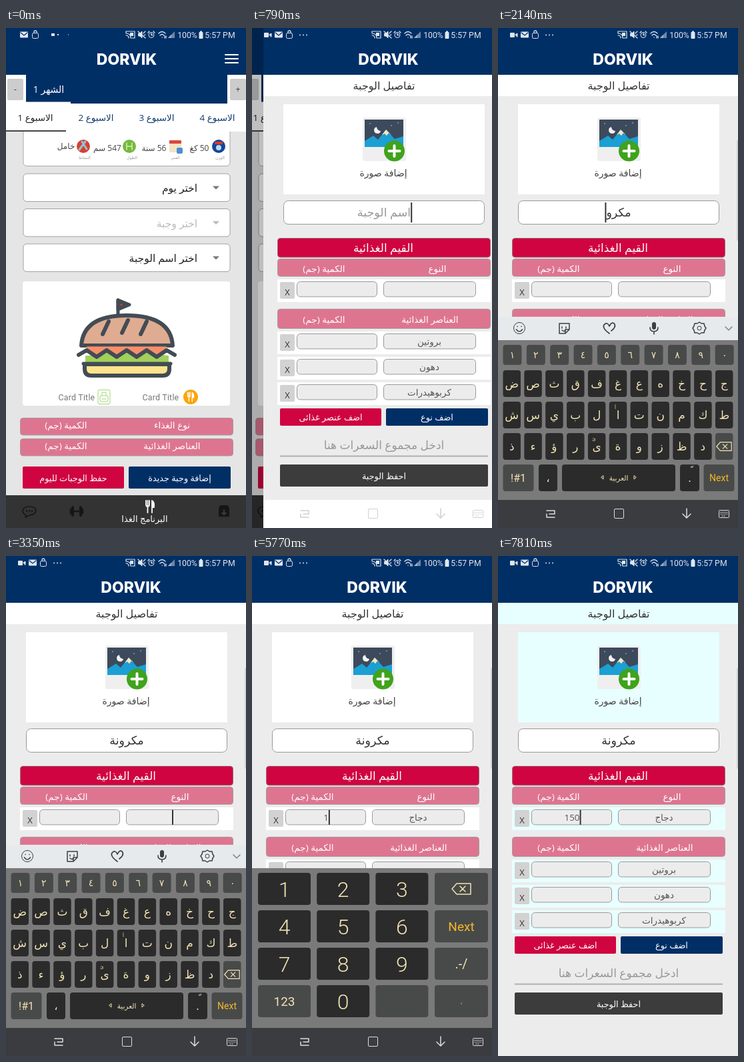
Animation, 360 px wide and 748 px high, one loop 8000 ms. Source, as an HTML page:

```html
<!DOCTYPE html>
<html lang="ar">
<head>
<meta charset="utf-8">
<style>
html,body{margin:0;width:100%;height:100%;overflow:hidden;background:#ececec}
svg{display:block;width:360px;height:748px}
text{font-family:"Open Sans","DejaVu Sans",sans-serif;text-anchor:middle}
.ar{direction:rtl}
.start{text-anchor:start}
.ro{font-family:Roboto,sans-serif}
.thin{font-weight:300}
.logo{font-family:Inter,sans-serif;font-weight:800}
.w{fill:#fff}
</style>
</head>
<body>
<svg id="stage" viewBox="0 0 360 748"></svg>
<script>
const LOOP = 8000, NAVY = '#002f66', RED = '#cf0441', PINK = '#de7590', KEY = '#2b2b2b', KEY2 = '#484a49', IVORY = '#f3e3b4';

const R = (x, y, w, h, fill, r = 0, stroke = 'none', cls = '') =>
  `<rect x="${x}" y="${y}" width="${w}" height="${h}" fill="${fill}" rx="${r}" stroke="${stroke}" class="${cls}"/>`;
const C = (x, y, r, fill, stroke = 'none') => `<circle cx="${x}" cy="${y}" r="${r}" fill="${fill}" stroke="${stroke}"/>`;
const P = (d, stroke, w = 1, fill = 'none') =>
  `<path d="${d}" stroke="${stroke}" stroke-width="${w}" fill="${fill}" stroke-linecap="round" stroke-linejoin="round"/>`;
const T = (x, y, s, size, fill, cls = 'ar', extra = '') =>
  `<text x="${x}" y="${y}" font-size="${size}" fill="${fill}" class="${cls}" ${extra}>${s}</text>`;
const G = (id, body, extra = '') => `<g id="${id}" ${extra}>${body}</g>`;
const at = (x, y, body) => `<g transform="translate(${x} ${y})">${body}</g>`;

const logo = x => T(x, 54.5, 'DORVIK', 23, '#fff', 'logo');
const button = (x, y, w, h, fill, label) => R(x, y, w, h, fill, 2) + T(x + w / 2, y + h / 2 + 5, label, 12.8, '#fff');
const fork = (x, y, k, c) => at(x, y, `<g transform="scale(${k})">` +
  P('M-6 -9V-3Q-6 0 -3.5 0Q-1 0 -1 -3V-9M-3.5 -9V9', c, 1.8) + P('M3 9V-9Q7 -7 6 1H3', c, 1.8, c) + '</g>');

// Home page
function burger() {
  const ink = '#434c55';
  return P('M168 407V431', ink, 5) + P('M168 407L185 414L168 421Z', ink, 5, ink) + C(173, 414, 1.5, '#e33') +
    P('M113 475Q116 430 181 430Q247 430 250 475Z', ink, 6, '#dfac91') +
    P('M154 439L145 458M183 437L174 456M211 439L202 458', ink, 6) +
    P('M122 478H240L226 489L211 478L196 489L181 478L166 489L151 478L136 489Z', '#f98f68', 3, '#f98f68') +
    P('M120 491V499H243V491L226 489L211 481L196 491L181 481L166 491L151 481L136 491Z', '#a2d05a', 2, '#a2d05a') +
    P('M109 489L121 482L136 492L151 482L166 492L181 482L196 492L211 482L226 492L241 482L253 489', ink, 6) +
    P('M118 503H245V510Q245 520 235 520H128Q118 520 118 510Z', ink, 6, '#fde48c') + P('M116 502H247', ink, 5);
}

function home() {
  const small = (x, y, s) => T(x, y, s, 12, '#444');
  const title = x => T(x, 556.5, 'Card Title', 12.4, '#777', 'ro', 'letter-spacing=".2"');
  let s = R(0, 0, 360, 748, '#e5e5e5');
  s += R(26, 120, 310, 86.5, '#fff', 5, '#aaa');
  s += small(90, 181, 'خامل') + small(152, 184, '547 سم') + small(222, 184, '56 سنة') + small(290, 184, '50 كغ');
  s += C(116, 177, 10, '#d9402f') + P('M110 182L119 170M114 170L121 181', '#8ac4d8', 3) +
    C(185, 177, 10, '#76b83f') + P('M181 172V182M189 172V182M181 177H189', '#d4efb4', 1.5) +
    R(245, 168, 18, 18, '#f4e3c4', 1) + R(245, 168, 18, 5, '#d8483b', 1) + R(256, 179, 9, 9, '#4b8fd6', 2) +
    C(319, 177, 10, '#13469a') + R(313, 170, 12, 4, '#d33b35', 1) + C(319, 179, 4, '#b9d8ee');
  [['النشاط', 118], ['الطول', 189], ['العمر', 254], ['الوزن', 321]].forEach(([n, x]) => s += T(x, 196, n, 6, '#999'));
  s += R(0, 0, 360, 70, NAVY) + R(0, 70, 360, 85, '#fff') + R(30, 70, 302, 43, NAVY) + R(30, 110.5, 67, 2.5, '#fff') +
    R(2, 76, 24, 32, '#ccc', 2) + T(14, 96, '-', 12, '#333') + R(336, 76, 24, 32, '#ccc', 2) + T(348, 96, '+', 12, '#333') +
    T(64, 97, 'الشهر 1', 14, '#fff') + logo(181) + P('M329 40H348M329 46H348M329 52H348', '#fff', 2);
  [44, 135, 226, 317].forEach((x, i) => s += T(x, 139, 'الاسبوع ' + (i + 1), 13.5, i ? '#123c70' : '#222'));
  s += R(0, 153, 90, 2, '#444');
  [['اختر يوم', 218, '#222'], ['اختر وجبة', 270.5, '#bbb'], ['اختر اسم الوجبة', 323, '#222']].forEach(([n, y, c]) =>
    s += R(26, y, 310, 41.5, '#fff', 5, '#a2a2a2') + T(287, y + 27, n, 15.5, c, 'ar start') +
      `<path d="M310 ${y + 18.5}h10l-5 5z" fill="${c == '#bbb' ? c : '#777'}"/>`);
  s += R(25, 379, 311, 186, '#fff', 4) + burger() + title(106) + title(232) +
    R(138, 541.5, 18, 21, '#fff', 2, '#a4d774') + R(141, 550, 12, 9, 'none', 2, '#a4d774') + P('M144 549V545H150V549M144 555H150', '#a4d774') +
    C(277, 552, 11, '#fba50a') + fork(277, 552, .75, '#fff');
  [['نوع الغذاء', 583], ['العناصر الغذائية', 614]].forEach(([n, y]) =>
    s += R(21.5, y + .5, 319, 25.5, PINK, 4, '#a59a9d') + T(90, y + 16, 'الكمية (جم)', 13.5, '#fff') + T(249, y + 16, n, 13.5, '#fff'));
  s += button(25, 656, 152, 33, RED, 'حفظ الوجبات لليوم') + button(184, 656, 153, 33, NAVY, 'إضافة وجبة جديدة') +
    R(184, 656, 153, 33, '#fff', 2, 'none', 'press');
  s += R(0, 699, 360, 49, '#333') + fork(216, 716, 1, '#fff') + T(208, 739, 'البرنامج الغذا', 13, '#fff');
  s += P('M30 729Q25 726 25 722Q26 716 35 716Q44 716 45 722Q44 728 35 729L29 732Z', '#161616', 1.6) +
    P('M31 722.5H31.1M35 722.5H35.1M39 722.5H39.1', '#161616', 2.5) +
    P('M100 717V729M112 717V729', '#161616', 4) + P('M97 720V726M115 720V726M100 723H112', '#161616', 2.5) +
    P('M320 718L322 715H332L334 718V730H320Z', '#161616', 2, '#161616') + P('M327 721V727M324 725L327 728L330 725', '#444', 1.5);
  return s;
}

// Meal details page
function picture() {
  return R(149, 134, 65, 65, '#efefef', 3) + R(152, 137, 58, 41, '#3c4a5c') +
    P('M152 178V169L165 161L172 167L184 152L197 166L210 162V178Z', 'none', 0, '#1c9fd3') +
    P('M184 152L178 160L182 158L185 161L188 157L192 160Z', 'none', 0, '#fbe5c0') +
    P('M170 148A5 5 0 1 0 176 154A6 6 0 0 1 170 148Z', 'none', 0, '#f4f4f4') +
    P('M160 143H160.1M192 146H192.1M202 142H202.1', '#dde', 1.3) +
    C(196.5, 184, 15.5, '#3fa31c') + P('M196.5 176V192M188.5 184H204.5', '#fff', 4);
}

function row(y, name = '') {
  return R(21, y, 320, 34, '#fff', 0, 'none', 'w') + R(25, y + 4, 22, 25, '#d2d2d2', 2) + T(36, y + 23.5, 'X', 13, '#333') +
    R(50.5, y + 3.5, 120, 22.5, '#ececec', 5, '#999') + R(180.5, y + 3.5, 138, 22.5, '#ececec', 5, '#999') +
    T(249, y + 20, name, 13.5, '#555');
}

const bar = (y, h, name) => R(21.5, y + .5, 319, h - 1, PINK, 4, '#a59a9d') +
  T(91, y + h / 2 + 6, 'الكمية (جم)', 13.5, '#fff') + T(name.length > 6 ? 250 : 261, y + h / 2 + 6, name, 13.5, '#fff');

function page() {
  return R(0, 0, 360, 748, '#ececec') + R(0, 0, 360, 70, NAVY) + logo(187.5) +
    R(0, 70, 360, 32, '#fff', 0, 'none', 'w') + T(181, 92, 'تفاصيل الوجبة', 16, '#333') +
    R(30, 114, 302, 135, '#fff', 1, 'none', 'w') + picture() + T(180, 222, 'إضافة صورة', 14, '#444') +
    R(30.5, 258.5, 301, 35, '#fff', 7, '#999') +
    R(21.5, 314.5, 319, 28.5, RED, 4, '#96707b') + T(180, 335, 'القيم الغذائية', 17, '#fff') +
    bar(345, 27, 'النوع') + row(376) + bar(420, 30, 'العناصر الغذائية') +
    row(454, 'بروتين') + row(492, 'دهون') + row(530, 'كربوهيدرات') +
    button(25, 569, 152, 26, RED, 'اضف عنصر غذائى') + button(184, 569, 153, 26, NAVY, 'اضف نوع') +
    T(181, 630, 'ادخل مجموع السعرات هنا', 17, '#999') + R(25, 639.5, 312, 2, '#b0b0b0') +
    button(25, 653, 312, 33, '#3c3c3c', 'احفظ الوجبة') + R(358, 168, 2, 150, '#d2d2d2') + G('fields', '');
}

// Keyboards
const key = (x, y, w, h, label, size = 19, fill = KEY, color = IVORY, cls = 'ar') =>
  R(x, y, w, h, fill, 4) + T(x + w / 2, y + h / 2 + size * .36, label, size, color, cls);
const erase = (x, y) => at(x, y, P('M-14 0L-7 -8H14V8H-7ZM-2 -4L6 4M6 -4L-2 4', IVORY, 1.5));

function letters() {
  const ink = '#3b3f43';
  let s = R(0, 432, 360, 35, '#e6eaed') + R(0, 467, 360, 290, '#7a7a7a');
  s += C(32, 449, 8.5, 'none', ink) + P('M27.5 451Q32 457 36.5 451M29 446.5H29.1M35 446.5H35.1', ink, 1.6) +
    P('M92 442H107V451L101 457H92ZM107 451H101V457M96 447V449M102 447V449M96 452Q99 455 101 452', ink, 1.5) +
    P('M167 457Q156 449 159 444Q164 439 167 446Q171 438 175 443Q177 448 170 453', ink, 1.7) +
    R(231, 440, 6, 11, ink, 3) + P('M228 448Q228 454 234 454Q240 454 240 448M234 454V458', ink, 1.6) +
    P('M302 440L305 442H309L310 446L312 449L310 452L309 456H305L302 458L299 456H295L294 452L292 449L294 446L295 442H299Z', ink, 1.5) +
    C(302, 449, 3, 'none', ink) + P('M341 447L346 452L351 447', '#7d8388', 1.5);
  [...'١٢٣٤٥٦٧٨٩٠'].forEach((c, i) => s += key(7.5 + i * 35.35, 474, 28, 30, c, 14, KEY2));
  ['ضصثقفغعهخحج', 'شسيبلاتنمكط', 'ذءؤرىةوزظد'].forEach((r, j) =>
    [...r].forEach((c, i) => s += key(7.5 + i * 31.85, 512 + j * 47, 26.5, 40, c, 17)));
  s += T(144, 617, 'ئ', 7, IVORY) + T(176, 570, 'أ', 7, IVORY);
  s += R(326, 606, 26.5, 40, KEY2, 4) + `<g transform="translate(339 626) scale(.8)">${erase(0, 0)}</g>`;
  return s + key(7.5, 653, 46, 40, '!#1', 16, KEY2, IVORY, 'ro') + key(61, 653, 28, 40, '،', 17) +
    key(96, 653, 170, 40, 'العربية', 10.5) + P('M158 670V675L155 672.5ZM204 670V675L207 672.5Z', IVORY, 1) +
    key(273, 653, 29, 40, '.', 18, KEY, IVORY, 'ro') + T(288, 665, 'ّ', 12, IVORY) + key(308.5, 653, 46, 40, 'Next', 14, KEY2, '#f4b72a', 'ro');
}

function digits() {
  let s = R(0, 467, 360, 290, '#7a7a7a');
  for (let i = 0; i < 9; i++) s += key(9 + i % 3 * 88.2, 474 + (i / 3 | 0) * 56, 79, 48, i + 1, 32, KEY, IVORY, 'ro thin');
  return s + key(9, 642, 79, 48, '123', 19, KEY2, IVORY, 'ro') + key(97.2, 642, 79, 48, '0', 32, KEY, IVORY, 'ro thin') +
    R(185.4, 642, 79, 48, KEY2, 4) + R(274, 474, 80, 48, KEY2, 4) + erase(314, 498) +
    key(274, 530, 80, 48, 'Next', 19, KEY2, '#f4b72a', 'ro') + key(274, 586, 80, 48, '.-/', 20, KEY2, IVORY, 'ro') +
    key(274, 642, 80, 48, '،', 14, KEY2, '#8c8a80');
}

const navIcons = c => P('M73 722H85V727M85 732H73M77 727H85M73 732V727', c, 1.5) + R(174.5, 719.5, 14, 14, 'none', 1.5, c) +
  P('M283 719V733M277 727L283 733L289 727', c, 1.5) + R(331.5, 721.5, 15, 11, 'none', 1, c) +
  P('M334 724.5H344M334 727H344M336 730H342', c, 1.2).replace('<path', '<path stroke-dasharray="1 2"');

// Status bar
const mail = x => R(x - 6, 5.5, 12, 9, '#dfe6ee', 1) + P(`M${x - 5} 7L${x} 11L${x + 5} 7`, NAVY, 1.2);
const bag = x => R(x - 4.5, 7.5, 9, 8, 'none', 2, '#dfe6ee') + P(`M${x - 2} 7V5Q${x} 3 ${x + 2} 5V7`, '#dfe6ee', 1.2);
function status() {
  const c = '#dfe6ee';
  return G('early', mail(27) + bag(44) + R(68, 8, 5, 4, c) + R(77, 9, 2, 2, c) + R(93, 9, 1, 2, '#8899b0')) +
    G('late', R(18, 7, 7, 7, c, 1) + P('M26 10L29 8V13Z', c, 1, c) + mail(40) + bag(56) + P('M72 10.5H72.1M77 10.5H77.1M82 10.5H82.1', c, 1.8)) +
    P('M180 8V5H193V15H188M180 11Q184 11 184 15M180 8Q187 8 187 15', c, 1.2) + R(186, 7, 5, 5, c) +
    P('M199 8H201L204 5V15L201 12H199Z', c, 1, c) + P('M198 5L209 15M206 8L209 5M207 11L209 10', c, 1.2) +
    C(218, 10.5, 4, 'none', c) + P('M218 8V10.5H220M213 7L215 5M223 7L221 5', c, 1.3) +
    P('M229 8Q234 3 239 8M231 11Q234 8 237 11M234 14H234.1M238 12V15M240 15V12', c, 1.3) +
    P('M253 5V15H243Z', 'none', 0, '#6d87a8') + P('M248 10V15H243Z', 'none', 0, '#9fb0c6') +
    T(272, 15, '100%', 12.3, c, 'ro') + R(289.5, 6, 6, 10, c, 1) + R(291, 4.5, 3, 2, c) + T(321, 15, '5:57 PM', 12.3, c, 'ro');
}

const stage = document.getElementById('stage');
stage.innerHTML = G('home', home()) + R(0, 0, 360, 748, '#000', 0, 'none', 'dim') + G('page', page()) +
  G('letters', letters()) + G('digits', digits()) + G('nav', R(0, 706, 360, 42, '#3a3c40') + navIcons('#dcdcdc')) +
  G('paleNav', R(17, 706, 343, 42, '#fff') + navIcons('#d0d0d0')) +
  G('ripple', R(229, 706, 107, 46, '#bdb0ad', 23) + C(22, 726, 2.5, '#d0c4c0')) + status();

// Each step holds its value until the next one
function hold(sel, prop, steps) {
  const frames = steps.map(([t, v]) => ({[prop]: v, offset: t / LOOP, easing: 'step-end'}));
  frames.push({[prop]: steps[steps.length - 1][1], offset: 1});
  document.querySelectorAll(sel).forEach(el => el.animate(frames, {duration: LOOP, iterations: Infinity}));
}
const move = (sel, axis, steps) => hold(sel, 'transform', steps.map(([t, v]) => [t, `translate${axis}(${v}px)`]));
const fade = (sel, ...steps) => hold(sel, 'opacity', steps);
const show = (sel, from, to) => fade(sel, ...(from ? [[0, 0]] : []), [from, 1], ...(to < LOOP ? [[to, 0]] : []));

// side: which end of the text the caret sits at; 0 hides it
let count = 0;
function typing(x, y, size, color, top, height, steps) {
  const box = document.getElementById('fields');
  steps.forEach(([t, s, side, tint = color], i) => {
    const id = 'type' + count++;
    box.insertAdjacentHTML('beforeend', G(id, T(x, y, s, size, tint)));
    const g = document.getElementById(id), w = s ? g.firstChild.getComputedTextLength() : 0;
    if (side) g.insertAdjacentHTML('beforeend', R(x + side * (w / 2 + 1) - 1, top, 2, height, '#333'));
    show('#' + id, t, i + 1 < steps.length ? steps[i + 1][0] : LOOP);
  });
}
typing(181, 282, 17.5, '#333', 261, 30, [[0, 'اسم الوجبة', 1, '#999'], [1670, 'م', -1], [1920, 'مك', -1], [2030, 'مكر', -1],
  [2140, 'مكرو', -1], [2340, 'مكرون', -1], [2440, 'مكرونة', -1], [3040, 'مكرونة', 0]]);
typing(249, 396, 13.5, '#555', 380, 22, [[0, '', 0], [3040, '', 1], [3700, 'د', -1], [3840, 'دج', -1], [4130, 'دجا', -1],
  [4230, 'دجاج', -1], [4680, 'دجاج', 0]]);
typing(111, 396, 13.5, '#555', 380, 22, [[0, '', 0], [4820, '', 1], [5660, '1', 1], [6090, '15', 1], [6320, '150', 1]]);

fade('.press', [0, 0], [100, .12], [200, .22], [300, .14], [400, 0]);
show('#early', 0, 100);
show('#late', 100, LOOP);
move('#page', 'X', [[0, 360], [590, 250], [690, 80], [790, 17], [890, 0]]);
move('#home', 'X', [[0, 0], [590, -5], [690, -13], [790, -16]]);
fade('.dim', [0, 0], [590, .1], [690, .2], [790, .25]);
show('#paleNav', 790, 890);
move('#letters', 'Y', [[0, 320], [890, 190], [990, 70], [1100, 12], [1200, 0]]);
fade('#letters', [0, 0], [890, .5], [990, .85], [1100, 1], [5200, 0]);
move('#digits', 'Y', [[0, 0], [6650, 10], [6760, 60]]);
fade('#digits', [0, 0], [5200, 1], [6650, .76], [6760, .3], [6860, 0]);
fade('#nav', [0, 0], [890, .6], [990, 1], [6650, .4], [6760, .2], [6860, 0]);
fade('#ripple', [0, 0], [6540, .2], [6650, .5], [6760, .3], [6860, 0]);
hold('.w', 'fill', [[0, '#fff'], [6970, '#e8ffff']]);
</script>
</body>
</html>
```
